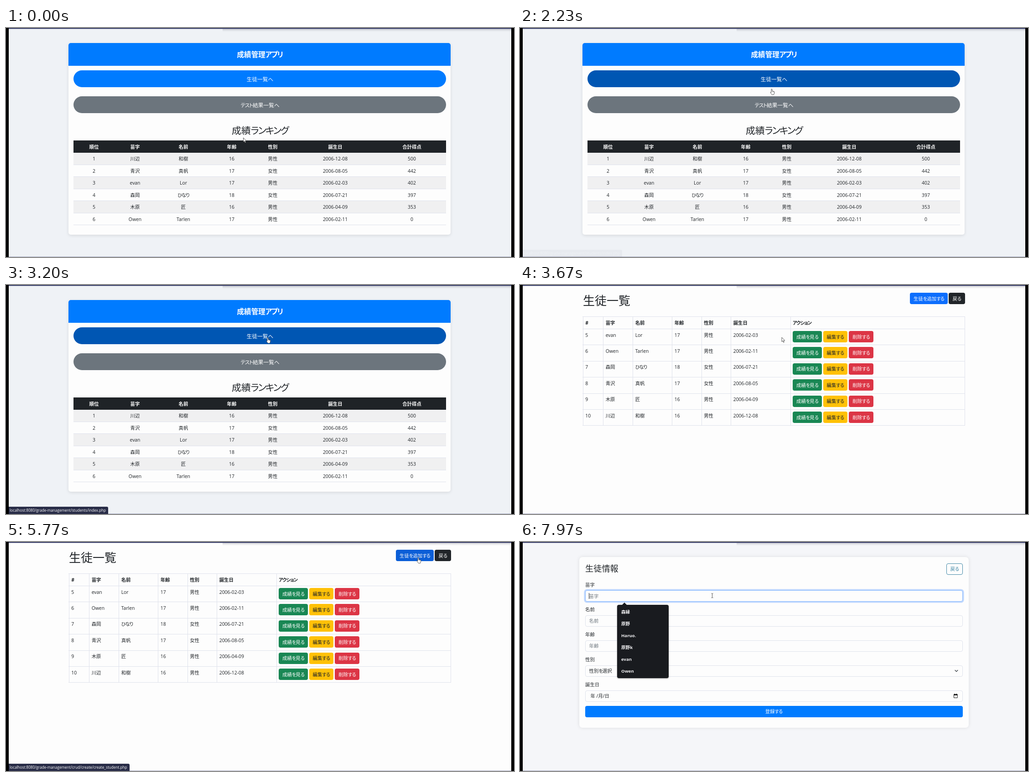
Recreate the animation shown at these times as an HTML page. Size 1114 by 503 pixels, loop 8 s.

```html
<!DOCTYPE html>
<html lang="ja">
<head>
<meta charset="utf-8">
<title>成績管理アプリ</title>
<style>
html, body { margin: 0; width: 100%; height: 100%; overflow: hidden; background: #000; }
#stage { position: absolute; left: 0; top: 0; width: 1114px; height: 503px; overflow: hidden; background: #000;
  font-family: "Open Sans", "Noto Sans CJK JP", "Noto Sans CJK", sans-serif; font-feature-settings: "palt"; }
#stage div, #stage svg { position: absolute; box-sizing: border-box; }
.page { left: 0; top: 0; width: 1114px; height: 503px; }
.t { white-space: pre; line-height: 20px; }
.k { letter-spacing: -.1em; }
#status { left: 6px; top: 487px; height: 16px; padding: 0 5px 0 2px; background: #292d48; color: #fff;
  border-radius: 0 3px 0 0; font-size: 8.2px; line-height: 16px; white-space: pre; }
svg { overflow: visible; }
</style>
</head>
<body>
<div id="stage"></div>
<script>
const LOOP = 8000;
const INK = '#212529', LINE = '#dfe2ec', WHITE = '#fdfdfd', BLUE = '#007bff';
const stage = document.getElementById('stage');

function add(parent, cls, css) {
  const el = document.createElement('div');
  el.className = cls;
  Object.assign(el.style, css);
  parent.append(el);
  return el;
}

function box(parent, x, y, x2, y2, background, css = {}) {
  return add(parent, '', { left: x + 'px', top: y + 'px', width: x2 - x + 'px', height: y2 - y + 'px', background, ...css });
}

// y is the middle of the line; centred text takes x as its middle
function text(parent, str, x, y, { size = 10.4, color = INK, weight = 400, center = false } = {}) {
  const el = add(parent, 't', {
    left: x + 'px', top: y - 10 + 'px', fontSize: size + 'px', color, fontWeight: weight,
    transform: center ? 'translateX(-50%)' : ''
  });
  el.innerHTML = str.replace(/[ぁ-ヶー]+/g, '<span class="k">$&</span>');
  return el;
}

function button(parent, label, x, y, x2, y2, fill, { color = '#fff', radius = 4, size = 10.4 } = {}) {
  const el = box(parent, x, y, x2, y2, fill, { borderRadius: radius + 'px' });
  text(parent, label, (x + x2) / 2, (y + y2) / 2, { size, color, center: true });
  return el;
}

function svg(parent, x, y, body) {
  const el = document.createElementNS('http://www.w3.org/2000/svg', 'svg');
  el.setAttribute('width', 16);
  el.setAttribute('height', 16);
  el.style.left = x + 'px';
  el.style.top = y + 'px';
  el.innerHTML = body;
  parent.append(el);
  return el;
}

function page(background) {
  const el = add(stage, 'page', {});
  box(el, 6, 0, 1108, 503, background);
  return el;
}

// id, family name, given name, age, gender, birthday, score
const students = [
  [5, 'evan', 'Lor', 17, '男性', '2006-02-03', 402],
  [6, 'Owen', 'Tarlen', 17, '男性', '2006-02-11', 0],
  [7, '森岡', 'ひなり', 18, '女性', '2006-07-21', 397],
  [8, '青沢', '真帆', 17, '女性', '2006-08-05', 442],
  [9, '木原', '匠', 16, '男性', '2006-04-09', 353],
  [10, '川辺', '和樹', 16, '男性', '2006-12-08', 500]
];

// Ranking
const ranking = page('#eff2f6');
box(ranking, 137, 33, 975, 454, WHITE, { borderRadius: '5px', boxShadow: '0 2px 7px rgba(0,0,0,.1)' });
box(ranking, 137, 33, 975, 83, BLUE, { borderRadius: '5px 5px 0 0' });
text(ranking, '成績管理アプリ', 556.5, 58, { size: 15.6, weight: 700, color: '#fff', center: true });
const toStudents = button(ranking, '生徒一覧へ', 148, 93, 965, 130, BLUE, { radius: 18.5, size: 11.7 });
const toExams = button(ranking, 'テスト結果一覧へ', 148, 150, 965, 187, '#6c757d', { radius: 18.5, size: 11.7 });
text(ranking, '成績ランキング', 557, 225, { size: 20.8, weight: 500, center: true });
box(ranking, 148, 247, 965, 274, '#1f2327');
const rankCols = [193, 283, 389, 495, 585, 722, 890];
['順位', '苗字', '名前', '年齢', '性別', '誕生日', '合計得点'].forEach((s, i) =>
  text(ranking, s, rankCols[i], 260.5, { weight: 700, color: '#fff', center: true }));
[...students].sort((a, b) => b[6] - a[6]).forEach((row, r) => {
  const y = 274 + r * 26.5;
  box(ranking, 148, y, 965, y + 26.5, r % 2 ? WHITE : '#f0f0f1', { borderBottom: '1px solid ' + LINE });
  [r + 1, ...row.slice(1)].forEach((v, i) => text(ranking, String(v), rankCols[i], y + 13, { center: true }));
});

// Student list
const list = page(WHITE);
text(list, '生徒一覧', 138, 34, { size: 26, weight: 500 });
const addStudent = button(list, '生徒を追加する', 855, 17, 938, 42, '#0d6efd');
button(list, '戻る', 940, 17, 975.5, 42, INK);
const edges = [137.5, 182, 247, 333, 397.5, 462, 592.5, 975];
const rowTop = r => r ? 96 + (r - 1) * 35.4 : 69;
for (let r = 0; r < 8; r++) box(list, 137, rowTop(r), 976, rowTop(r) + 1, LINE);
edges.forEach(x => box(list, x, 69, x + 1, 309, LINE));
['#', '苗字', '名前', '年齢', '性別', '誕生日', 'アクション'].forEach((s, i) =>
  text(list, s, edges[i] + 5.7, 82.5, { weight: 700 }));
students.forEach((row, r) => {
  const y = rowTop(r + 1);
  row.slice(0, 6).forEach((v, i) => text(list, String(v), edges[i] + 5.7, y + 13.5));
  button(list, '成績を見る', 598, y + 5, 662, y + 30, '#198754');
  button(list, '編集する', 664.5, y + 5, 718, y + 30, '#ffc107', { color: INK });
  button(list, '削除する', 721, y + 5, 775, y + 30, '#dc3545');
});

// Form
const form = page('#f5f6f9');
box(form, 129.5, 33, 984, 407.5, WHITE, { borderRadius: '7px', boxShadow: '0 0 8px rgba(0,0,0,.1)' });
text(form, '生徒情報', 143, 57.5, { size: 18.2, weight: 500 });
button(form, '戻る', 935, 47, 970.5, 71.5, WHITE, { color: '#3f87a6' }).style.border = '1px solid #3f87a6';
const fields = [['苗字', '苗字'], ['名前', '名前'], ['年齢', '年齢'], ['性別', '性別を選択'], ['誕生日', '年 /月/日']];
const inputs = fields.map(([label, hint], i) => {
  const y = 106 + i * 54.9;
  text(form, label, 143, y - 12.5);
  const el = box(form, 142.5, y, 970.5, y + 25, WHITE, { border: '1px solid ' + LINE, borderRadius: '4px' });
  text(form, hint, i < 4 ? 151.5 : 154.5, y + 12.5, { color: i < 3 ? '#6c757d' : INK });
  return el;
});
svg(form, 953, 280, '<path d="M.7 1.3 4 4.6 7.3 1.3" fill="none" stroke="#343a40" stroke-width="1.3"/>');
svg(form, 951, 333, '<path d="M.5 1.7h7.6v7.5H.5zM2.2 0v2M6.4 0v2" fill="none" stroke="#111"/><path d="M.5 1.5h7.6v2.2H.5z" fill="#111"/>');
button(form, '登録する', 142.5, 360, 970.5, 384.5, BLUE);
const caret = box(form, 151, 112, 152, 125, INK);
const menu = add(form, '', { left: 0, top: 0 });
svg(menu, 223, 132.5, '<path d="M0 6 6 0l6 6z" fill="#191b1f"/>');
box(menu, 213, 138, 326, 299, '#191b1f', { borderRadius: '4px', boxShadow: '0 1px 3px rgba(0,0,0,.35)' });
['森縁', '原野', 'Haruo.', '原野k', 'evan', 'Owen'].forEach((s, i) =>
  text(menu, s, 222, 154 + i * 25.9, { size: 9.6, weight: 700, color: '#f1f1f3' }));

// Browser edges
box(stage, 475, 2, 1108, 8, 'linear-gradient(rgba(60,60,80,.2), rgba(60,60,80,0))');
box(stage, 6, 0, 1108, 2, '#3c426c');
box(stage, 6, 502, 1108, 503, '#a4a8c0');
const status = add(stage, '', {});
status.id = 'status';

const outline = 'stroke="#333" stroke-width=".8" stroke-linejoin="round" fill="#fff"';
const cursors = {
  arrow: svg(stage, 0, 0, `<path d="M0 0v9.5l2.2-2 1.5 3.6 1.6-.7-1.5-3.4h3z" ${outline}/>`),
  hand: svg(stage, 0, 0, `<path d="M-1 1q1-1.4 2 0v4l4 .9q1 .3 1 1.4l-.6 3.2-.9 2.5H.4L-2.6 8.8q-.6-1.5.6-1.5l1 .9z" ${outline}/><path d="M2.3 5.5v2M4 6v1.6" stroke="#555" stroke-width=".6"/>`),
  beam: svg(stage, 0, 0, '<path d="M-2 .5h1.5L0 1l.5-.5H2M0 1v8.5M-2 10h1.5L0 9.5l.5.5H2" fill="none" stroke="#444" stroke-width=".9"/>')
};

// time, x, y of the pointer tip
const path = [
  [30, 520.5, 241], [420, 610, 226], [800, 668, 206], [1300, 668, 206], [1330, 666, 196], [1470, 651, 113],
  [1800, 610, 108], [2230, 552, 133.5], [2300, 552, 135], [2470, 552, 176], [2770, 552, 176], [3080, 574, 115],
  [3830, 574, 115], [4430, 238, 99], [4570, 238, 99], [4630, 239, 186], [4770, 239, 186], [5540, 904, 33.5],
  [6080, 904, 33.5], [6400, 421.5, 112.5]
];
const shapes = [[0, 'arrow'], [1450, 'hand'], [3330, 'arrow'], [5500, 'hand'], [6110, 'arrow'], [6390, 'beam']];
const host = 'localhost:8080/grade-management/';
const links = [
  [1620, 2080, 'students/index.php'], [2420, 2880, 'exams/index.php'],
  [2880, 3500, 'students/index.php'], [5590, 6180, 'crud/create/create_student.php']
];
const LIST_AT = 3300, FORM_AT = 6080, FOCUS_AT = 6770, MENU_AT = 7270;

const clamp = v => Math.min(1, Math.max(0, v));
const smooth = v => v * v * (3 - 2 * v);
const ramp = (t, start, span) => smooth(clamp((t - start) / span));
const pulse = (t, on, off, span) => ramp(t, on, span) - ramp(t, off, span);
const mix = (a, b, p) => `color-mix(in srgb, ${b} ${p * 100}%, ${a})`;
const show = (el, on) => { el.style.display = on ? '' : 'none'; };

function pointer(t) {
  const i = path.findIndex(p => p[0] > t);
  if (i < 1) return (i ? path[path.length - 1] : path[0]).slice(1);
  const [a, b] = [path[i - 1], path[i]];
  const p = ramp(t, a[0], b[0] - a[0]);
  return [a[1] + (b[1] - a[1]) * p, a[2] + (b[2] - a[2]) * p];
}

function draw(t) {
  show(ranking, t < LIST_AT);
  show(list, t >= LIST_AT && t < FORM_AT);
  show(form, t >= FORM_AT);

  const overStudents = pulse(t, 1470, 2235, 300) + pulse(t, 2890, 9000, 300);
  toStudents.style.background = mix(BLUE, '#0056b3', overStudents);
  toExams.style.background = mix('#6c757d', '#545b62', pulse(t, 2330, 2880, 300));
  addStudent.style.background = mix('#0d6efd', '#0b5ed7', pulse(t, 5500, 9000, 150));

  const focus = ramp(t, FOCUS_AT, 200);
  inputs[0].style.borderColor = mix(LINE, '#86b7fe', focus);
  inputs[0].style.boxShadow = `0 0 0 2.6px rgba(13,110,253,${.25 * focus})`;
  show(caret, t >= FOCUS_AT && (t < MENU_AT || t >= 7700));
  menu.style.opacity = ramp(t, MENU_AT, 130);

  const link = links.find(([on, off]) => t >= on && t < off + (off === 2880 ? 0 : 170));
  show(status, link);
  if (link) {
    const [on, off, file] = link;
    status.textContent = host + file;
    const swap = on === 2880 || off === 2880;
    status.style.opacity = (on === 2880 ? 1 : ramp(t, on, 120)) - (swap && off === 2880 ? 0 : ramp(t, off, 170));
  }

  const [x, y] = pointer(t);
  const shape = shapes.filter(s => s[0] <= t).pop()[1];
  for (const name in cursors) show(cursors[name], name === shape);
  cursors[shape].style.transform = `translate(${x}px, ${y}px)`;
}

const start = performance.now();
function tick() {
  draw((performance.now() - start) % LOOP);
  requestAnimationFrame(tick);
}
tick();
</script>
</body>
</html>
```
